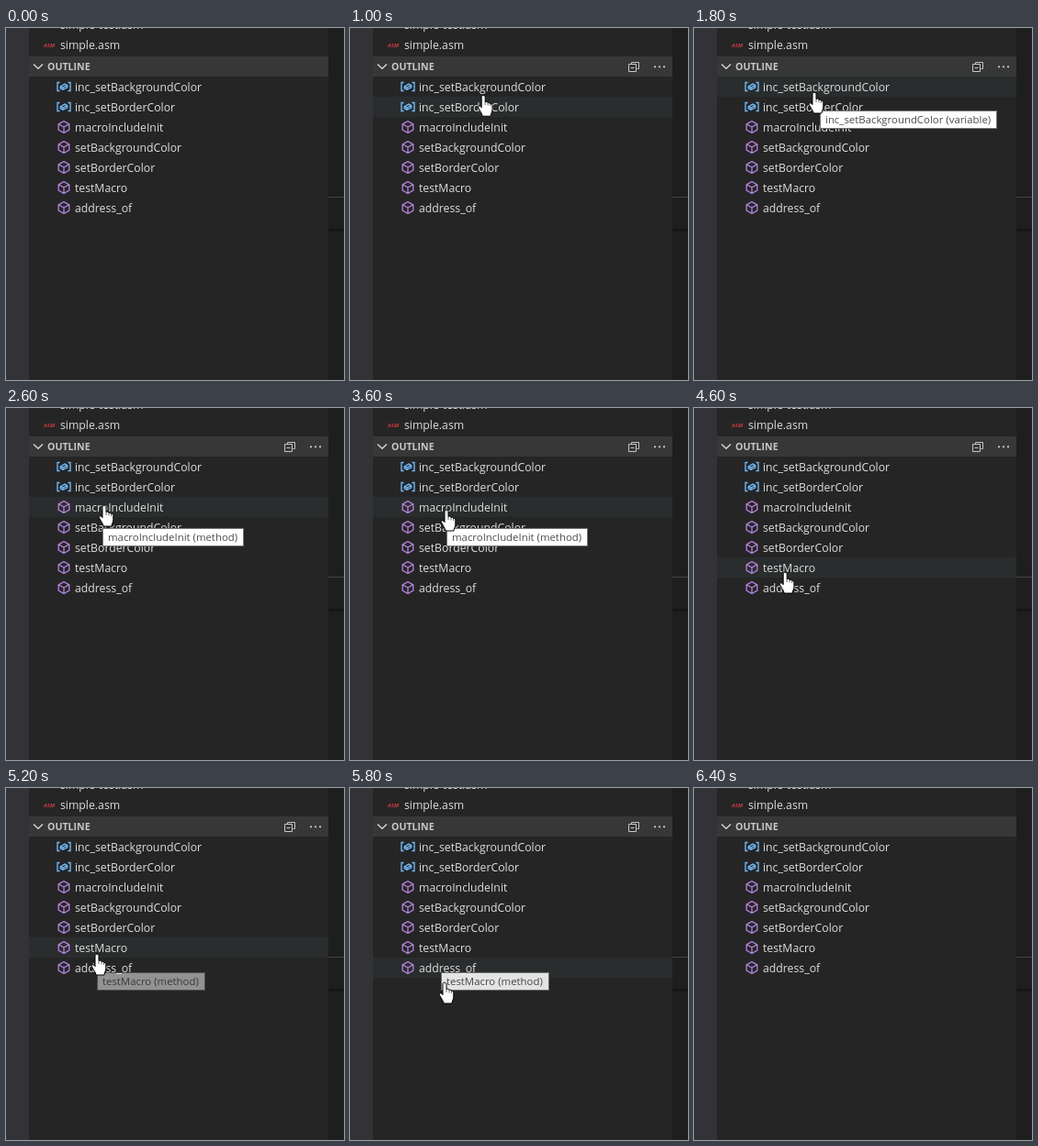
Write an HTML page that moves like this. It is 368 by 384 pixels and loops after 6.8 s.

```html
<!DOCTYPE html>
<html lang="en">
<head>
<meta charset="utf-8">
<title>Outline hover</title>
<style>
html, body { margin: 0; width: 100%; height: 100%; overflow: hidden; background: #252526; }
svg { display: block; width: 368px; height: 384px; font-family: "Open Sans", "Noto Sans", sans-serif; }
.label { font-size: 12.25px; font-weight: 500; fill: #dedede; }
.tip { font-size: 11.4px; font-weight: 500; fill: #4c4c4c; }
.line { fill: none; }
</style>
</head>
<body>
<svg viewBox="0 0 368 384" xmlns="http://www.w3.org/2000/svg">
  <defs>
    <g id="method" class="line" stroke="#b180d7" stroke-width="1.35" stroke-linejoin="round">
      <path d="M0-6.3L5.8-3.2V3.2L0 6.5L-5.8 3.2V-3.2ZM-5.6-3.1L0 0L5.6-3.1M0 0V6.3"/>
    </g>
    <g id="variable" class="line" stroke="#75beff" stroke-width="1.3">
      <path d="M-4.5-4.5H-7V4.5H-4.5M4.5-4.5H7V4.5H4.5"/>
      <path d="M-3.7-.3L1-2.9L3.7-1.4V.8L-1 3.3L-3.7 1.9ZM-3.6-.2L-1 1.1L3.6-1.3M-1 1.1V3.2"/>
    </g>
  </defs>
  <rect width="368" height="384" fill="#252526"/>
  <rect width="25" height="384" fill="#333337"/>
  <rect x="351" width="17" height="384" fill="#1e1e1e"/>
  <rect x="351" y="184" width="17" height="1" fill="#434343"/>
  <rect x="351" y="219" width="17" height="3" fill="#171717"/>
  <text class="label" x="59" y="1">simple-test.asm</text>
  <text class="label" x="59" y="23">simple.asm</text>
  <text x="41" y="20.5" font-size="6" font-weight="700" font-style="italic" fill="#cc3a40">ASM</text>
  <rect x="25" y="31" width="326" height="22" fill="#373738"/>
  <path class="line" d="M30 39.5L35 44.3L40 39.5" stroke="#d2d2d2" stroke-width="1.5"/>
  <text x="45" y="46" font-size="10.6" font-weight="700" fill="#c8c8c8">OUTLINE</text>
  <g id="actions">
    <path class="line" d="M306.5 39.5V37.5H314.5V44.5H312.5M303.5 39.5H311.5V47.5H303.5ZM305.5 43.5H309.5" stroke="#c5c5c5"/>
    <path class="line" d="M332 42.3h0M337 42.3h0M342 42.3h0" stroke="#d0d0d0" stroke-width="2.2" stroke-linecap="round"/>
  </g>
  <rect id="hover" x="25" width="326" height="22" fill="#2a2d2e"/>
  <g id="rows"></g>
  <g id="tips"></g>
  <g id="hand" stroke="#000" stroke-linejoin="round">
    <path fill="#fff" d="M-2 2C-2-.3 2-.3 2 2V7.5C3 6.7 5 7 5 8.6C6 7.9 7.5 8.3 7.6 9.6C8.8 9.2 9.8 10 9.8 11.5V15.5C9.8 18.5 8.2 20 8 23H-1C-1.2 20.3-4.3 16.5-5.6 13.7C-6.4 11.9-4.2 11-3 12.4L-2 13.6Z"/>
    <path class="line" stroke-width=".6" d="M2 7.5V11M5 8.6V11.5M7.6 9.6V12"/>
  </g>
</svg>
<script>
const LOOP = 6800, STEP = 200, TOP = 53, ROW = 22, FADE = 400;
const $ = id => document.getElementById(id);

const items = ["inc_setBackgroundColor", "inc_setBorderColor", "macroIncludeInit",
  "setBackgroundColor", "setBorderColor", "testMacro", "address_of"];
const kind = name => name.startsWith("inc_") ? "variable" : "method";
const rowY = i => TOP + i * ROW;

// the pointer glides from stop to stop
const stops = [
  { t: 200, x: 342, y: 150 },
  { t: 1200, x: 137, y: 70 },
  { t: 1800, x: 131, y: 70 },
  { t: 2000, x: 105, y: 111 },
  { t: 2600, x: 107, y: 106 },
  { t: 3200, x: 105, y: 111 },
  { t: 3600, x: 105, y: 111 },
  { t: 4800, x: 99, y: 181 },
  { t: 5400, x: 99, y: 181 },
  { t: 5800, x: 103, y: 212 },
  { t: 6200, x: 126, y: 322 }
];

// a tooltip opens just below where the pointer came to rest
const tips = [
  { row: 0, rest: 1200, leave: 1850 },
  { row: 2, rest: 2000, leave: 3800 },
  { row: 5, rest: 4800, leave: 5750 }
];

const ramp = (t, a, length) => Math.min(1, Math.max(0, (t - a) / length));
const easeOut = k => 1 - (1 - k) ** 2;

function pointer(t) {
  const i = stops.findIndex(s => s.t >= t);
  if (t < stops[0].t || i < 0) return null;
  if (i === 0) return stops[0];
  const a = stops[i - 1], b = stops[i];
  const k = easeOut(ramp(t, a.t, b.t - a.t));
  return { x: a.x + (b.x - a.x) * k, y: a.y + (b.y - a.y) * k };
}

function build() {
  $("rows").innerHTML = items.map((name, i) =>
    `<use href="#${kind(name)}" x="63" y="${rowY(i) + 11}"/>
    <text class="label" x="75" y="${rowY(i) + 16}">${name}</text>`).join("");

  $("tips").innerHTML = tips.map(({ row, rest }) => {
    const { x, y } = pointer(rest), name = items[row];
    return `<g transform="translate(${x} ${y + 20})">
      <rect x=".5" y=".5" height="19" fill="#fff" stroke="#767676"/>
      <text class="tip" x="6" y="14">${name} (${kind(name)})</text></g>`;
  }).join("");

  for (const tip of $("tips").children) {
    const [box, text] = tip.children;
    box.setAttribute("width", Math.round(text.getComputedTextLength()) + 12);
  }
}

const show = (id, on) => { $(id).style.display = on ? "" : "none"; };

function draw(ms) {
  const t = Math.floor(ms % LOOP / STEP) * STEP;
  const p = pointer(t);
  show("hand", p);
  show("actions", p);
  if (p) $("hand").setAttribute("transform", `translate(${p.x} ${p.y})`);

  // the row highlight trails the pointer by one step
  const last = pointer(t - STEP);
  const row = last ? Math.floor((last.y - TOP) / ROW) : -1;
  const over = p && row in items;
  show("hover", over);
  if (over) $("hover").setAttribute("y", rowY(row));

  tips.forEach(({ rest, leave }, i) => {
    const alpha = ramp(t, rest + STEP, FADE) * (1 - ramp(t, leave, FADE));
    $("tips").children[i].setAttribute("opacity", alpha);
  });
}

build();
const start = performance.now();
function tick() {
  draw(performance.now() - start);
  requestAnimationFrame(tick);
}
tick();
</script>
</body>
</html>
```
